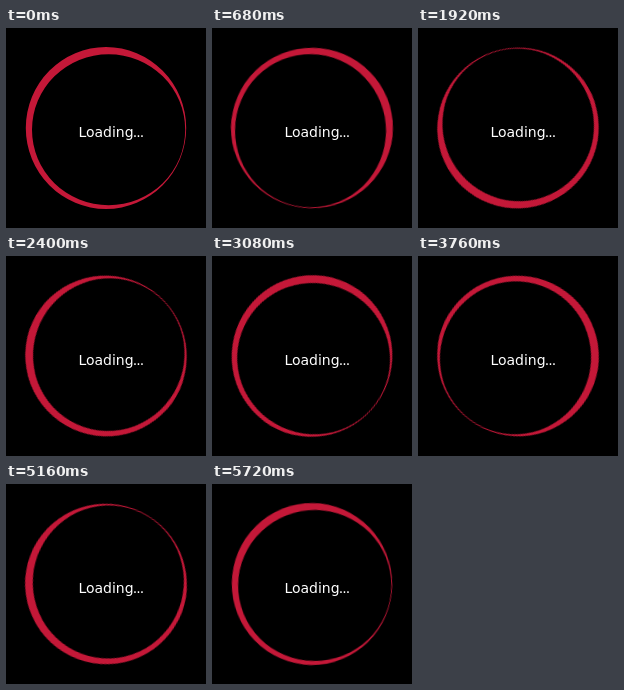
An HTML page for the animation above (5.76 s loop, 200 by 200 pixels).

```html
<!DOCTYPE html>
<html lang="en">
<head>
<meta charset="utf-8">
<title>Loading</title>
<style>
  html, body { margin: 0; width: 100%; height: 100%; overflow: hidden; background: #000; }
  svg { display: block; width: 100vw; height: 100vh; }
  .ring {
    fill: #c41838;
    fill-rule: evenodd;
    filter: blur(.5px);
    transform-origin: 100px 100px;
    animation: spin 2880ms steps(72) infinite;
  }
  text { font: 14px "DejaVu Sans", sans-serif; fill: #fff; }
  .tight { letter-spacing: -.9px; }
  @keyframes spin { to { transform: rotate(360deg); } }
</style>
</head>
<body>
<svg viewBox="0 0 200 200">
  <!-- Outer ellipse with an off-centre ellipse cut out of it -->
  <path class="ring" d="
    M19.8 100a80.2 81 0 1 0 160.4 0a80.2 81 0 1 0 -160.4 0z
    M26 101.75a76.6 75.55 0 1 0 153.2 0a76.6 75.55 0 1 0 -153.2 0z"/>
  <text x="72.4" y="109">Loadin<tspan class="tight">g...</tspan></text>
</svg>
</body>
</html>
```
